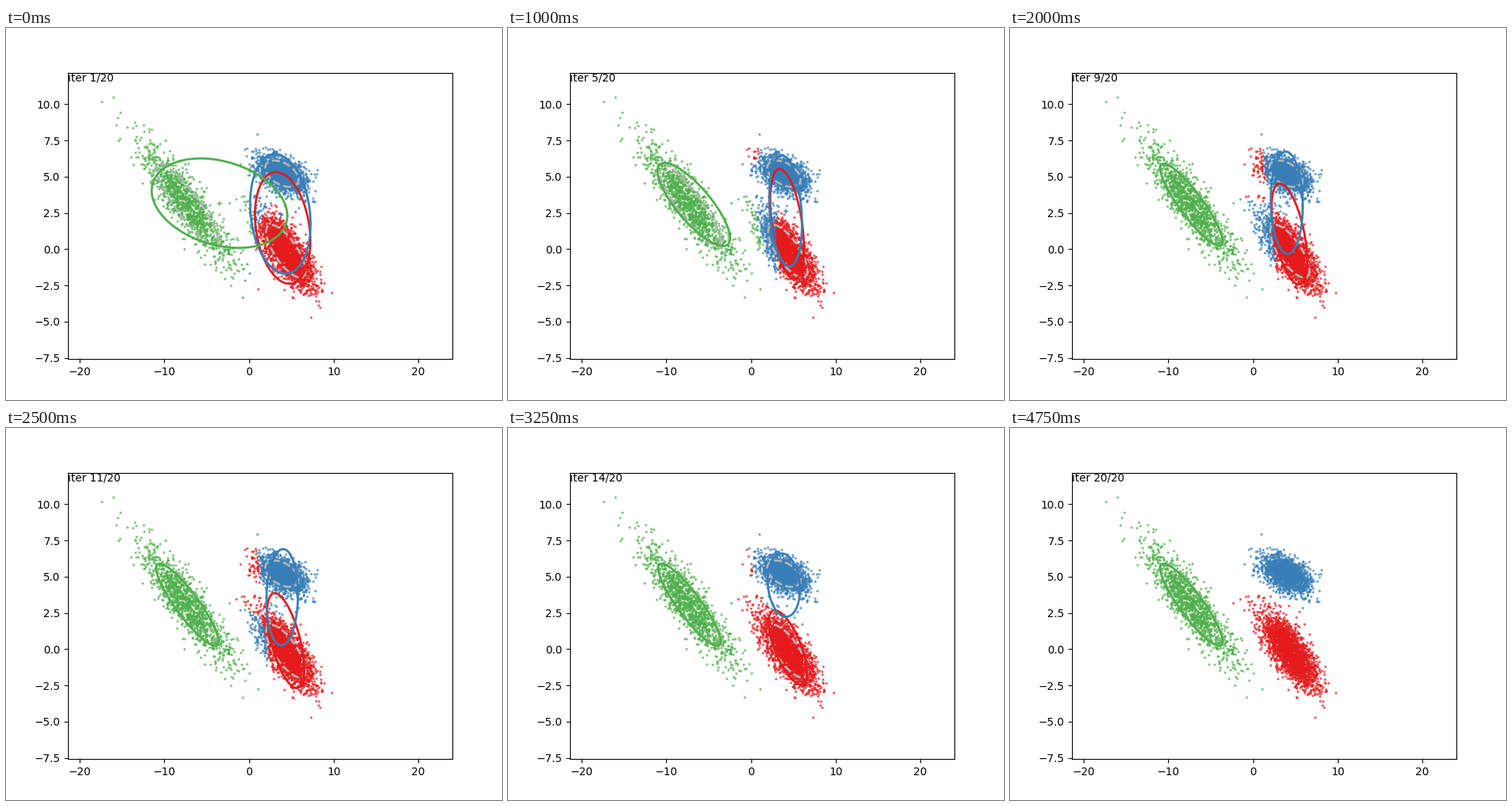
Write a matplotlib script that moves like this. It is 640x480 px and loops after 5000 ms.

```python
import numpy as np
import matplotlib.pyplot as plt
from matplotlib.animation import FuncAnimation

STEPS = 20
RED, BLUE, GREEN = "#e41a1c", "#377eb8", "#4daf4a"
COLORS = np.array([RED, BLUE, GREEN])

# A pose is an ellipse in stage pixels (y down): centre x, y, half width, half height, tilt
TRUTH = np.array([
    (361, 288, 25.3, 34, 0.74),
    (356, 188, 21.5, 17, 0.45),
    (234, 228, 40.3, 53, 0.89),
])
START = np.array([
    (357, 258, 35.7, 72, 0.24),
    (354, 240, 39, 77, 0.17),
    (275.5, 226, 87.5, 57.7, 0.28),
])
# Red and blue first settle on nearly the same pose, then drift apart
SHARED = np.array([(360, 250, 21.5, 72.5, 0.42), (358.5, 238.5, 21.2, 73, 0.27)])
PARTING = np.array([(361, 279, 24.3, 59, 0.63), (356, 214.5, 20.2, 60, -0.12)])
COUNTS = 2400, 1900, 1200


def mix(a, b, t):
    return a + (b - a) * np.clip(t, 0, 1)


def poses(step):
    pair = mix(START[:2], SHARED, (step - 1) / 2)
    pair = mix(pair, PARTING, (max(step - 3, 0) / 9) ** 1.5)
    pair = mix(pair, TRUTH[:2], (step - 12) / 4.5)
    left = max(7 - step, 0) / 6
    return [*pair, mix(TRUTH[2], START[2], left ** 1.8)]


def to_data(px, py):
    return (px - 313.6) / 10.92, (285.4 - py) / 18.7


def place(pose, u, v):
    cx, cy, hx, hy, tilt = pose
    return cx + hx * u, cy + hy * (tilt * u + np.sqrt(1 - tilt ** 2) * v)


def outline(pose):
    t = np.linspace(0, 2 * np.pi, 160)
    return to_data(*place(pose, np.cos(t), np.sin(t)))


def log_density(pose, x, y):
    cx, cy, hx, hy, tilt = pose
    u, v = (x - cx) / hx, (y - cy) / hy
    rest = 1 - tilt ** 2
    return -(u * u + v * v - 2 * tilt * u * v) / rest - np.log(hx * hy * np.sqrt(rest))


# The outlines lie at sqrt(2) standard deviations
rng = np.random.default_rng(4)
px, py = np.hstack([place(pose, *rng.normal(scale=0.5 ** 0.5, size=(2, n)))
                    for pose, n in zip(TRUTH, COUNTS)])

fig, ax = plt.subplots(figsize=(6.4, 4.8), dpi=100)
ax.set_xlim(-21.39, 24.03)
ax.set_ylim(-7.58, 12.18)

dots = ax.scatter(*to_data(px, py), s=5.2, lw=0, alpha=0.7)
for pose in TRUTH:
    ax.plot(*outline(pose), color="#b3b3b3", lw=2, ls="--", zorder=2)
rings = [ax.plot([], [], color=c, lw=2, zorder=3)[0] for c in COLORS]
marks = [ax.plot([], [], "+", color=c, ms=4.5, mew=1, zorder=1.5)[0] for c in COLORS]
note = ax.text(0, 1, "", transform=ax.transAxes, va="top", fontsize=10)


def draw(i):
    step = i + 1
    # Points take the colour of the likeliest ellipse of the step before
    scores = [log_density(pose, px, py) for pose in poses(max(step - 1, 1))]
    dots.set_facecolor(COLORS[np.argmax(scores, axis=0)])
    for ring, mark, pose in zip(rings, marks, poses(step)):
        ring.set_data(*outline(pose))
        x, y = to_data(*pose[:2])
        mark.set_data([x], [y])
    note.set_text(f"iter {step}/{STEPS}")
    return [dots, *rings, *marks, note]


anim = FuncAnimation(fig, draw, frames=STEPS, interval=250, repeat=True, repeat_delay=0)
plt.show()
```
